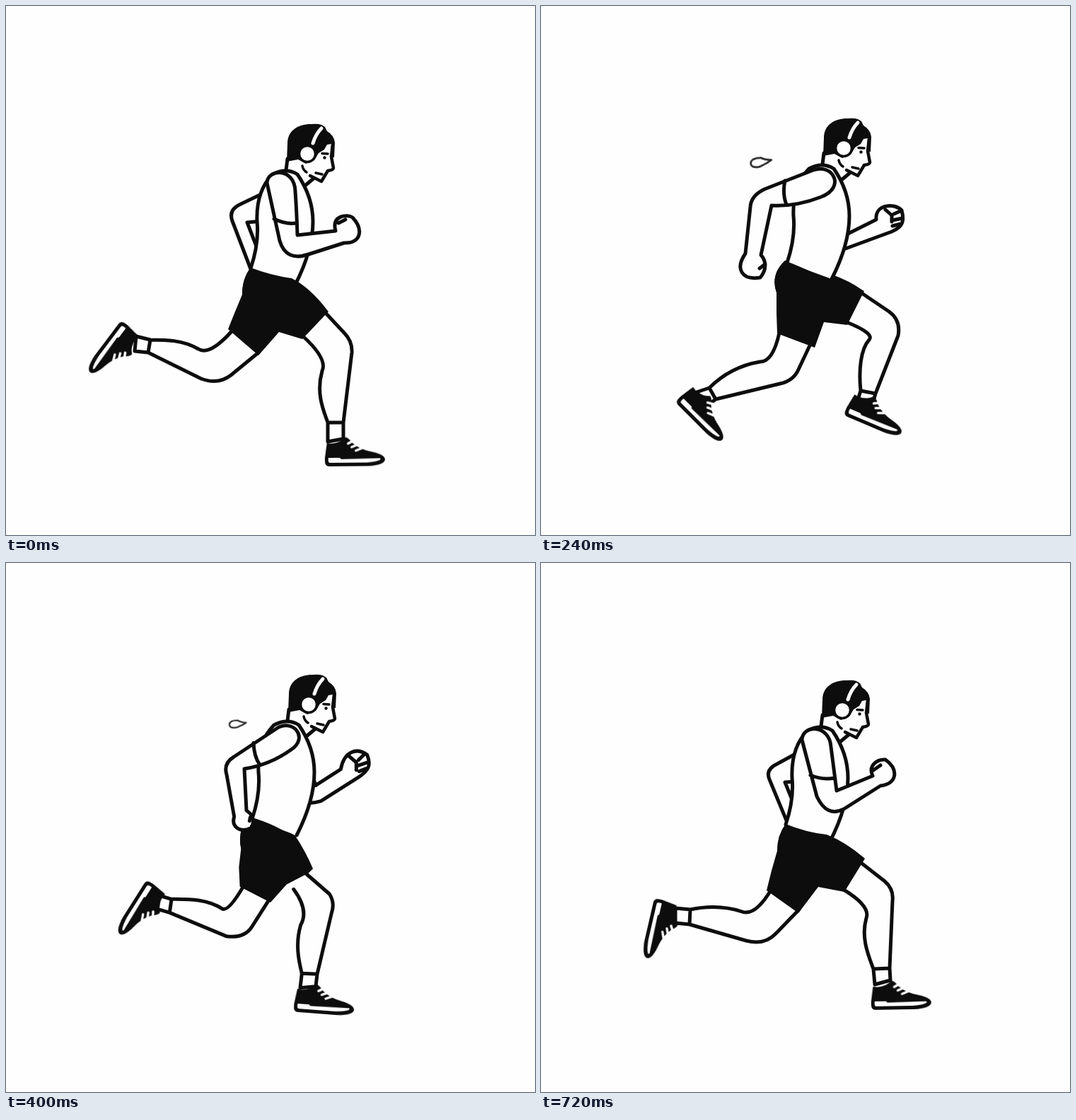
An HTML page without scripts for the animation above (0.76 s loop, 748 px wide and 748 px high).

```html
<!DOCTYPE html>
<html lang="en">
<head>
<meta charset="utf-8">
<title>Runner</title>
<style>
html, body { margin: 0; width: 100%; height: 100%; overflow: hidden; background: #fefefe; }
svg { display: block; width: 100vw; height: 100vh; }
.line { fill: #fefefe; stroke: #0d0d0d; stroke-width: 5; stroke-linejoin: round; stroke-linecap: round; }
.thin { stroke-width: 3.5; }
.open { fill: none; }
.ink { fill: #0d0d0d; }
.paper { fill: #fefefe; }
.chalk { fill: none; stroke: #fefefe; stroke-linecap: round; }
.drop { fill: #fefefe; stroke: #2a2a2a; stroke-width: 3.5; stroke-linejoin: round; }

/* The picture advances every 40 ms: each segment steps once per 40 ms. */
.move { animation: 760ms steps(3) infinite; }
.bob { animation-name: bob; }
.near-leg { animation-name: near-leg; }
.far-leg { animation-name: far-leg; }
.near-shoe { animation-name: near-shoe; }
.far-shoe { animation-name: far-shoe; }
.near-shorts { animation-name: near-shorts; }
.far-shorts { animation-name: far-shorts; }
.near-arm { animation-name: near-arm; }
.far-arm { animation-name: far-arm; }
.drop-a { animation-name: drop-a; }
.drop-b { animation-name: drop-b; }

@keyframes bob {
  0% { transform: translate(0, 0); animation-timing-function: steps(2); }
  10.526% { transform: translate(0, -16px); animation-timing-function: steps(4); }
  31.578% { transform: translate(2px, -8px); animation-timing-function: steps(1); }
  36.842% { transform: translate(2px, -11px); animation-timing-function: steps(2); }
  47.368% { transform: translate(2px, -4px); }
  63.157% { transform: translate(2px, -19px); }
  78.947% { transform: translate(0, -10px); animation-timing-function: steps(1); }
  84.21% { transform: translate(0, -13px); animation-timing-function: steps(2); }
  94.736% { transform: translate(0, -1px); animation-timing-function: steps(1); }
  100% { transform: translate(0, 0); }
}

@keyframes near-leg {
  0%, 100% { d: path("M450 432L478 462Q490 474 489 490L477 589L477 612L455 616L455 589C449 572 438 548 447 516Q455 499 420 467M477 589L455 589"); animation-timing-function: steps(2); }
  10.526% { d: path("M430 442L441 482Q444 497 436 509L399 592L395 612L370 610L375 589C374 565 374 545 384 526Q402 500 391 458M399 592L375 589"); animation-timing-function: steps(2); }
  21.052% { d: path("M408 462L406 500Q404 515 396 522L312 584L304 596L288 586L296 570C312 545 330 525 350 517Q368 508 364 458M312 584L296 570"); animation-timing-function: steps(2); }
  31.578% { d: path("M381 478L364 514Q357 530 338 534L247 556L234 566L220 546L238 540C258 520 280 508 310 503Q328 503 337 462M247 556L238 540"); }
  47.368% { d: path("M344 486L306 514Q289 526 266 518L188 475L170 469L173 451L192 457C215 460 240 460 262 477Q278 488 312 452M188 475L192 457"); }
  63.157% { d: path("M427 458L431 515Q432 542 402 547L318 533L303 530L303 508L318 512C340 506 370 503 396 514Q390 500 383 468M318 533L318 512"); animation-timing-function: steps(2); }
  73.684% { d: path("M447 418L484 476Q496 492 484 508L425 562L414 574L394 562L405 546C412 525 430 505 450 500Q462 494 418 448M425 562L405 546"); animation-timing-function: steps(1); }
  78.947% { d: path("M455 402L494 429Q512 442 508 464L478 544L474 560L452 558L456 542C453 515 455 485 467 470Q477 461 433 444M478 544L456 542"); animation-timing-function: steps(2); }
  89.473% { d: path("M456 412L494 448Q504 460 503 474L508 560L509 582L486 584L486 562C476 540 468 515 470 490Q474 472 430 456M508 560L486 562"); animation-timing-function: steps(1); }
  94.736% { d: path("M454 425L486 450Q499 461 497 478L493 573L494 590L472 596L470 574C463 555 452 530 460 502Q466 485 428 462M493 573L470 574"); animation-timing-function: steps(1); }
}

@keyframes far-leg {
  0%, 100% { d: path("M357 490L318 522Q300 536 276 527L201 490L182 488L184 467L204 472C225 472 250 472 272 485Q288 495 320 459M201 490L204 472"); animation-timing-function: steps(2); }
  10.526% { d: path("M394 470L400 530Q396 560 352 553L286 514L274 512L284 488L294 497C318 498 345 505 366 524Q363 512 362 472M286 514L294 497"); animation-timing-function: steps(2); }
  21.052% { d: path("M424 438L465 490Q476 508 460 518L379 569L366 576L352 556L366 548C385 530 405 512 430 508Q438 505 396 456M379 569L366 548"); animation-timing-function: steps(2); }
  31.578% { d: path("M455 407L492 432Q509 444 505 466L473 548L469 562L447 560L452 544C449 515 452 485 464 472Q472 463 432 447M473 548L452 544"); animation-timing-function: steps(2); }
  42.105% { d: path("M448 415L483 448Q493 459 492 473L497 559L498 579L475 581L475 560C465 538 457 513 459 488Q463 470 422 458M497 559L475 560"); animation-timing-function: steps(1); }
  47.368% { d: path("M446 426L478 452Q490 463 488 480L475 578L474 596L452 600L453 578C446 562 437 536 446 503Q450 485 420 461M475 578L453 578"); }
  63.157% { d: path("M380 465L416 500Q416 515 405 525L370 588L366 604L344 602L349 585C350 565 352 545 358 530Q386 503 380 462M370 588L349 585"); }
  78.947% { d: path("M391 472L378 510Q373 524 354 532L273 574L264 580L246 568L264 553C278 532 298 512 325 505Q340 502 347 462M273 574L264 553"); }
  94.736% { d: path("M364 491L332 524Q316 541 290 534L210 511L190 509L190 488L211 490C235 485 260 485 284 493Q303 500 326 461M210 511L211 490"); animation-timing-function: steps(1); }
}

@keyframes near-shoe {
  0%, 100% { transform: translate(452px, 650px) rotate(-.5deg); animation-timing-function: steps(2); }
  10.526% { transform: translate(357px, 643px) rotate(8deg); animation-timing-function: steps(2); }
  21.052% { transform: translate(269px, 626px) rotate(22deg); animation-timing-function: steps(2); }
  31.578% { transform: translate(191px, 560px) rotate(45deg); }
  47.368% { transform: translate(156px, 428px) rotate(131deg); }
  63.157% { transform: translate(285px, 492px) rotate(105deg); animation-timing-function: steps(2); }
  73.684% { transform: translate(362px, 583px) rotate(48deg); animation-timing-function: steps(1); }
  78.947% { transform: translate(434px, 578px) rotate(21deg); animation-timing-function: steps(2); }
  89.473% { transform: translate(492px, 622px) rotate(-8deg); animation-timing-function: steps(1); }
  94.736% { transform: translate(468px, 631px) rotate(-1deg); animation-timing-function: steps(1); }
}

@keyframes far-shoe {
  0%, 100% { transform: translate(163px, 446px) rotate(127deg); animation-timing-function: steps(2); }
  10.526% { transform: translate(271px, 468px) rotate(127deg); animation-timing-function: steps(2); }
  21.052% { transform: translate(322px, 556px) rotate(75deg); animation-timing-function: steps(2); }
  31.578% { transform: translate(429px, 578px) rotate(23deg); animation-timing-function: steps(2); }
  42.105% { transform: translate(482px, 620px) rotate(-8deg); animation-timing-function: steps(1); }
  47.368% { transform: translate(448px, 634px) rotate(.5deg); }
  63.157% { transform: translate(327px, 633px) rotate(12deg); }
  78.947% { transform: translate(218px, 584px) rotate(36deg); }
  94.736% { transform: translate(161px, 475px) rotate(103deg); animation-timing-function: steps(1); }
}

@keyframes near-shorts {
  0%, 100% { d: path("M346 370Q334 385 334 408L386 461L419 471L456 432L455 431Q430 398 404 385Q375 381 346 370Z"); animation-timing-function: steps(2); }
  10.526% { d: path("M346 354Q324 376 339 406L390 461L392 461L436 447L434 440Q428 405 410 381Q376 361 346 354Z"); animation-timing-function: steps(4); }
  31.578% { d: path("M345 360Q324 380 333 405L333 434L334 463L387 483L400 447Q408 415 408 389Q385 376 345 360Z"); }
  47.368% { d: path("M344 364Q330 380 330 403L318 427L306 451L346 490L380 455Q400 420 406 393Q388 374 344 364Z"); }
  63.157% { d: path("M344 348Q320 370 337 406L352 436L380 471L430 460L429 455Q424 410 406 378Q375 362 344 348Z"); }
  78.947% { d: path("M345 360Q326 378 335 405L407 446L434 447L458 402L457 401Q430 381 412 374Q380 368 345 360Z"); }
  94.736% { d: path("M346 369Q334 385 334 407L392 458L429 465L458 418L457 417Q430 394 404 384Q375 381 346 369Z"); animation-timing-function: steps(1); }
}

@keyframes far-shorts {
  0%, 100% { d: path("M346 370Q334 385 334 408L324 432L314 457L357 494L386 461Q400 420 404 385Q375 381 346 370Z"); animation-timing-function: steps(2); }
  10.526% { d: path("M346 354Q324 376 339 406L345 441L357 476L391 479L392 461Q405 420 410 381Q376 361 346 354Z"); animation-timing-function: steps(4); }
  31.578% { d: path("M345 360Q324 380 333 405L400 447L433 451L457 403L455 402Q435 388 412 380Q385 376 345 360Z"); }
  47.368% { d: path("M344 364Q330 380 330 403L380 455L417 465L452 422L451 421Q432 400 410 389Q388 374 344 364Z"); }
  63.157% { d: path("M344 348Q320 370 337 406L345 421L352 436L380 471L400 455Q405 420 406 378Q375 362 344 348Z"); }
  78.947% { d: path("M345 360Q326 378 335 405L338 434L341 463L396 478L407 446Q412 410 412 374Q380 368 345 360Z"); }
  94.736% { d: path("M346 369Q334 385 334 407L326 435L319 463L364 495L392 458Q402 420 404 384Q375 381 346 369Z"); animation-timing-function: steps(1); }
}

@keyframes near-arm {
  0%, 100% { d: path("M369 250C370 230 408 228 409 262Q411 290 412 324L466 318C460 296 482 294 490 299C506 316 502 336 478 335L428 351Q396 362 387 332ZM379 301Q395 309 410 307M470 307L480 302"); animation-timing-function: steps(2); }
  10.526% { d: path("M372 226C390 208 414 222 410 244Q396 278 375 314L428 344C432 330 448 336 457 345C460 362 445 378 428 370L372 338Q346 330 349 305ZM358 273Q370 292 387 296M432 345L445 343"); animation-timing-function: steps(4); }
  31.578% { d: path("M385 232C412 222 432 256 396 270Q360 284 326 282L311 352C318 360 320 372 310 384C284 388 274 372 289 350L296 284Q297 268 316 259ZM345 247Q341 265 347 281M317 365L309 371"); }
  47.368% { d: path("M387 236C414 226 434 262 398 274Q362 288 325 284L309 350C316 360 320 372 306 385C280 386 272 366 287 352L297 286Q297 268 316 262ZM347 251Q343 268 349 283M316 365L308 371"); }
  63.157% { d: path("M374 230C390 206 418 218 413 244Q396 280 361 305L402 350C406 342 422 344 427 354C426 376 412 382 394 372L342 326Q327 314 335 298ZM356 261Q366 285 379 291M404 349L417 352"); }
  78.947% { d: path("M370 245C370 218 408 220 409 248Q416 292 413 319L462 299C456 282 470 275 480 276C500 290 498 312 476 314L424 343Q398 352 388 326ZM380 292Q397 300 412 298M463 289L474 284"); }
  94.736% { d: path("M369 250C370 228 408 228 410 260Q414 290 418 322L469 301C462 286 476 277 487 278C506 292 504 312 480 315L428 348Q404 360 390 330ZM381 300Q397 307 415 304M470 293L480 286"); animation-timing-function: steps(1); }
}

@keyframes far-arm {
  0%, 100% { d: path("M380 257L332 280Q314 288 320 304L346 372C352 385 375 385 378 372C380 360 370 350 358 350L341 306L375 303ZM360 366L366 370L366 374M368 366L374 364M366 371L376 371M364 376L374 376"); animation-timing-function: steps(2); }
  10.526% { d: path("M372 255L336 283Q322 292 330 304L350 340C355 360 380 360 385 345C390 335 380 325 370 322L362 300L380 290ZM366 334L372 340L372 346M374 338L382 336M372 342L384 342M370 348L380 348"); animation-timing-function: steps(4); }
  31.578% { d: path("M375 260L380 330Q390 352 428 344L496 319C512 312 514 304 510 289C500 278 472 280 474 302L434 322L410 270ZM487 288L496 296L496 305M499 294L508 290M497 303L511 300M497 311L509 308"); }
  47.368% { d: path("M385 270L412 325Q430 347 454 336L507 290C520 278 522 270 515 260C500 246 482 255 478 284L442 313L430 275ZM490 262L500 271L500 280M503 268L512 260M503 275L518 269M505 283L514 278"); }
  63.157% { d: path("M375 250L378 325Q385 343 428 338L478 331C498 326 506 318 502 294C486 288 470 290 464 307L430 317L405 260ZM476 296L486 304L486 318M489 300L495 292M488 309L502 306M488 318L502 315"); }
  78.947% { d: path("M372 255L354 300Q344 320 354 332L418 373C440 382 452 376 454 350C450 342 440 340 430 342L372 318L395 270ZM432 344L444 352L440 362M445 357L453 350M430 362L452 362M428 370L448 371"); }
  94.736% { d: path("M378 260L334 284Q317 292 323 306L347 364C352 380 385 385 390 365C390 355 375 350 360 347L345 310L375 308ZM366 360L372 364L372 370M374 362L382 358M372 366L384 366M370 372L380 372"); animation-timing-function: steps(1); }
}

@keyframes drop-a {
  0%, 10.526% { transform: translate(372px, 215px) rotate(5deg) scale(0); animation-timing-function: steps(1); }
  15.789% { transform: translate(352px, 216px) rotate(5deg) scale(.42); animation-timing-function: steps(3); }
  31.578% { transform: translate(312px, 220px) rotate(-10deg) scale(.78); }
  47.368% { transform: translate(268px, 235px) rotate(-35deg) scale(.12); animation-timing-function: steps(1); }
  52.631%, 100% { transform: translate(258px, 240px) rotate(-40deg) scale(0); }
}

@keyframes drop-b {
  0%, 42.105% { transform: translate(375px, 216px) rotate(5deg) scale(0); animation-timing-function: steps(1); }
  47.368% { transform: translate(352px, 221px) rotate(5deg) scale(.44); }
  63.157% { transform: translate(281px, 239px) rotate(-28deg) scale(1); }
  78.947% { transform: translate(245px, 278px) rotate(-45deg) scale(.22); animation-timing-function: steps(1); }
  84.21%, 100% { transform: translate(235px, 288px) rotate(-45deg) scale(0); }
}
</style>
</head>
<body>
<svg viewBox="0 0 748 748">
  <defs>
    <!-- Origin at the back lower corner of the sole, toe along +x. -->
    <g id="shoe">
      <path class="ink" d="M2-32Q18-29 28-40Q32-40 38-32Q47-23 66-19Q84-15 84-8Q83 0 60 1L5 1Q-1 1-1-6L-1-11Z"/>
      <path class="paper" d="M4-11L20-11L22-9L77-10Q81-6 58-4L6-4Q3-4 4-11Z"/>
      <path class="chalk" stroke-width="3.500" d="M32-31L41-36M37-26L49-31M43-21L53-25"/>
    </g>
    <path id="drop" d="M18 0Q6-2 0-7C-12-9-20-6-20 1C-20 9-6 10 0 7Q9 5 18 0Z"/>
  </defs>

  <use href="#drop" class="drop move drop-a"/>
  <use href="#drop" class="drop move drop-b"/>

  <path class="line move far-leg"/>
  <use href="#shoe" class="move far-shoe"/>
  <path class="ink move far-shorts"/>
  <path class="line move far-arm"/>

  <g class="move bob">
    <path class="line" d="M398 216L395 240L418 258L436 243"/>
    <path class="line" d="M346 371Q358 335 355 305C354 280 360 255 377 238Q396 228 412 238Q434 270 434 305Q434 345 409 394"/>
  </g>

  <path class="line move near-leg"/>
  <use href="#shoe" class="move near-shoe"/>
  <path class="ink move near-shorts"/>

  <g class="move bob">
    <path class="paper" d="M462 190L460 213L463 231L455 233L446 249L430 241L412 226L414 210Z"/>
    <path class="line thin open" style="stroke-width:4.500" d="M462 195L460 213L463 229Q463 232 455 233L446 248L430 240"/>
    <path class="ink" d="M397 220L398 195C398 176 413 167 431 167Q441 166 446 168L451 171L454 177Q464 183 465 193L464 214L459 214L460 195L454 196L450 203L442 208L436 218L424 223L413 217Z"/>
    <path class="line thin open" d="M447 208.500L455 209M438 236L447 238M419 226Q420 232 425 235"/>
    <circle class="ink" cx="450.500" cy="214.500" r="2.200"/>
    <circle class="line thin" cx="426" cy="209" r="11.500"/>
    <path class="chalk" stroke-width="5" d="M434 194Q438 181 446 173"/>
  </g>

  <path class="line move near-arm"/>
</svg>
</body>
</html>
```
